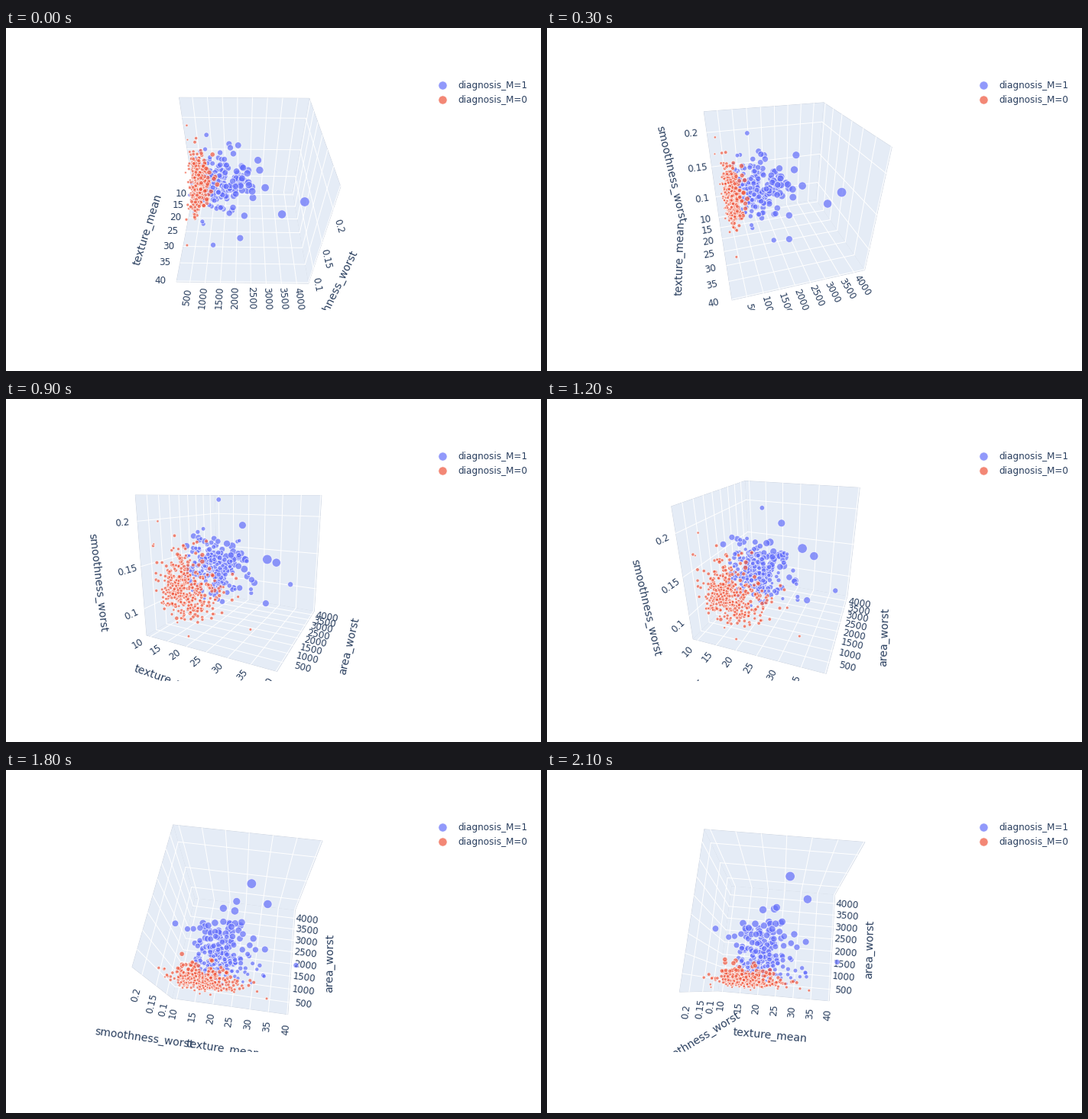
Recreate the animation shown at these times as a matplotlib script. Size 700 by 450 pixels, loop 2400 ms.

```python
import numpy as np
import matplotlib.pyplot as plt
from matplotlib.animation import FuncAnimation
from matplotlib.patches import Polygon
from matplotlib.transforms import Bbox, TransformedBbox

W, H, DPI = 700, 450, 100
PX = 72 / DPI
INK, PANE, EDGE = "#2a3f5f", "#e5ecf6", "#c9d0dc"
BLUE, RED = "#636efa", "#ef553b"
plt.rcParams["font.family"] = "DejaVu Sans"

# scene viewport and perspective camera
LEFT, TOP, RIGHT, BOTTOM = 80, 60, 532, 370
CX, CY = (LEFT + RIGHT) / 2, (TOP + BOTTOM) / 2
FOCAL = (BOTTOM - TOP) / 2 / np.tan(np.pi / 8)
DIST = 1.25 * np.sqrt(3)
CENTER = np.array([0.025, -0.025, 0])

# the camera drag: a smooth curve through a few (azimuth, elevation) poses
STEPS = 8
KEYS = {0: (0.8, 43.8), 1: (-15.5, 32), 2: (-45, 16.4),
        4: (-70.5, 25), 5: (-74.5, 46.5), 7: (-85, 79)}
PATH = np.polyfit(list(KEYS), list(KEYS.values()), len(KEYS) - 1)

# texture, area, smoothness
LO = np.array([8.79, 58, 0.0664])
HI = np.array([40.20, 4381, 0.2273])
TICKS = [range(10, 41, 5), range(500, 4001, 500), (0.1, 0.15, 0.2)]
TITLES = ["texture_mean", "area_worst", "smoothness_worst"]
TICK_GAP, TITLE_GAP = 0.122, 0.345

rng = np.random.default_rng(11)


def cloud(n, middle, spread, low, high, extremes):
    """Log-normal cloud within limits, plus its few most extreme cases."""
    z = rng.standard_normal((n - len(extremes), 3))
    return np.vstack([np.clip(middle * np.exp(z * spread), low, high), extremes])


malignant = cloud(212, (21.3, 1300, 0.143), (0.16, 0.39, 0.135),
                  (14, 510, 0.1), (32, 3230, 0.192),
                  [(26.3, 4254, 0.136), (31.1, 3432, 0.14), (39.3, 1377, 0.137),
                   (10.4, 2019, 0.1625), (23.8, 1160, 0.2226)])
benign = cloud(357, (17.4, 545, 0.124), (0.21, 0.28, 0.15),
               (9.7, 190, 0.08), (31, 1200, 0.193),
               [(33.8, 380, 0.0965), (19, 360, 0.072), (12.7, 296, 0.2)])


def camera(az, el):
    """Return a function from cube space to (screen xy, depth)."""
    a, e = np.radians((az, el))
    right = np.array([-np.sin(a), np.cos(a), 0])
    up = np.array([-np.sin(e) * np.cos(a), -np.sin(e) * np.sin(a), np.cos(e)])
    back = np.cross(right, up)

    def project(p):
        q = np.asarray(p, float) - CENTER
        depth = DIST - q @ back
        k = FOCAL / depth
        return np.stack([CX + k * (q @ right), CY - k * (q @ up)], -1), depth

    return project


def scaled(axis, value):
    return (value - LO[axis]) / (HI[axis] - LO[axis]) - 0.5


def slope(project, p, axis):
    """Readable angle of an axis direction as seen at point p."""
    step = np.eye(3)[axis] * 0.01
    (x0, y0), (x1, y1) = project([p - step, p + step])[0]
    angle = np.degrees(np.arctan2(y0 - y1, x1 - x0))
    return (angle + 90) % 180 - 90


fig = plt.figure(figsize=(W / DPI, H / DPI), dpi=DPI, facecolor="white")
ax = fig.add_axes([0, 0, 1, 1])


def label(p, text, angle, size):
    t = ax.text(*p, text, size=size * PX, color=INK, rotation=angle,
                ha="center", va="center", zorder=3, clip_on=True)
    view = Bbox.from_extents(LEFT, BOTTOM, RIGHT, TOP)
    t.set_clip_box(TransformedBbox(view, ax.transData))


def draw_panes(project):
    for axis, side in enumerate((-0.5, 0.5, -0.5)):
        u, v = [i for i in range(3) if i != axis]
        corners = np.full((4, 3), side)
        corners[:, u] = (-0.5, 0.5, 0.5, -0.5)
        corners[:, v] = (-0.5, -0.5, 0.5, 0.5)
        shape = project(corners)[0]
        ax.add_patch(Polygon(shape, fc=PANE, ec=EDGE, lw=0.8 * PX, zorder=0.8))
        ax.add_patch(Polygon(shape, fc=PANE, lw=0, zorder=1))
        for along, across in ((u, v), (v, u)):
            for value in TICKS[along]:
                line = np.full((2, 3), side)
                line[:, along] = scaled(along, value)
                line[:, across] = (-0.5, 0.5)
                ax.plot(*project(line)[0].T, color="white", lw=PX, zorder=2)


def draw_axis(project, axis, base, out, sign):
    """Ticks and title beside the cube edge through base, pushed along `out`."""
    def spot(along, gap):
        p = np.array(base, float)
        p[axis] = along
        p[out] += sign * gap
        return p

    for value in TICKS[axis]:
        p = spot(scaled(axis, value), TICK_GAP)
        label(project(p)[0], f"{value:g}", slope(project, p, out), 12)
    p = spot(0, TITLE_GAP)
    label(project(p)[0], TITLES[axis], slope(project, p, axis), 14)


def dots(x, y, diameter, color):
    ax.scatter(x, y, s=(diameter * PX) ** 2, c=color, alpha=0.7,
               edgecolors="white", linewidths=0.9 * PX, zorder=4)


def draw_points(project, data, color):
    xy, depth = project((data - LO) / (HI - LO) - 0.5)
    order = np.argsort(-depth)
    size = 12.6 * np.sqrt(data[:, 1] / data_max)
    dots(*xy[order].T, size[order], color)


data_max = malignant[:, 1].max()


def draw_legend():
    for y, color, flag in ((74.5, BLUE, 1), (93.5, RED, 0)):
        dots(571, y, 11.2, color)
        ax.text(591, y + 4.5, f"diagnosis_M={flag}", size=12 * PX, color=INK,
                va="baseline")


def draw(i):
    ax.cla()
    ax.set(xlim=(0, W), ylim=(H, 0))
    ax.axis("off")
    az, el = (np.polyval(coefs, i) for coefs in PATH.T)
    project = camera(az, el)
    draw_panes(project)
    draw_axis(project, 0, (0, -0.5, -0.5), 1, -1)
    draw_axis(project, 1, (0.5, 0, -0.5), 0, 1)
    # the smoothness axis sits on the right while seen from the side
    if az > -5:
        draw_axis(project, 2, (0.5, 0.5, 0), 0, 1)
    else:
        draw_axis(project, 2, (-0.5, -0.5, 0), 1, -1)
    draw_points(project, malignant, BLUE)
    draw_points(project, benign, RED)
    draw_legend()
    return []


anim = FuncAnimation(fig, draw, frames=STEPS, init_func=lambda: [],
                     interval=300, repeat=True, repeat_delay=0)
plt.show()
```
